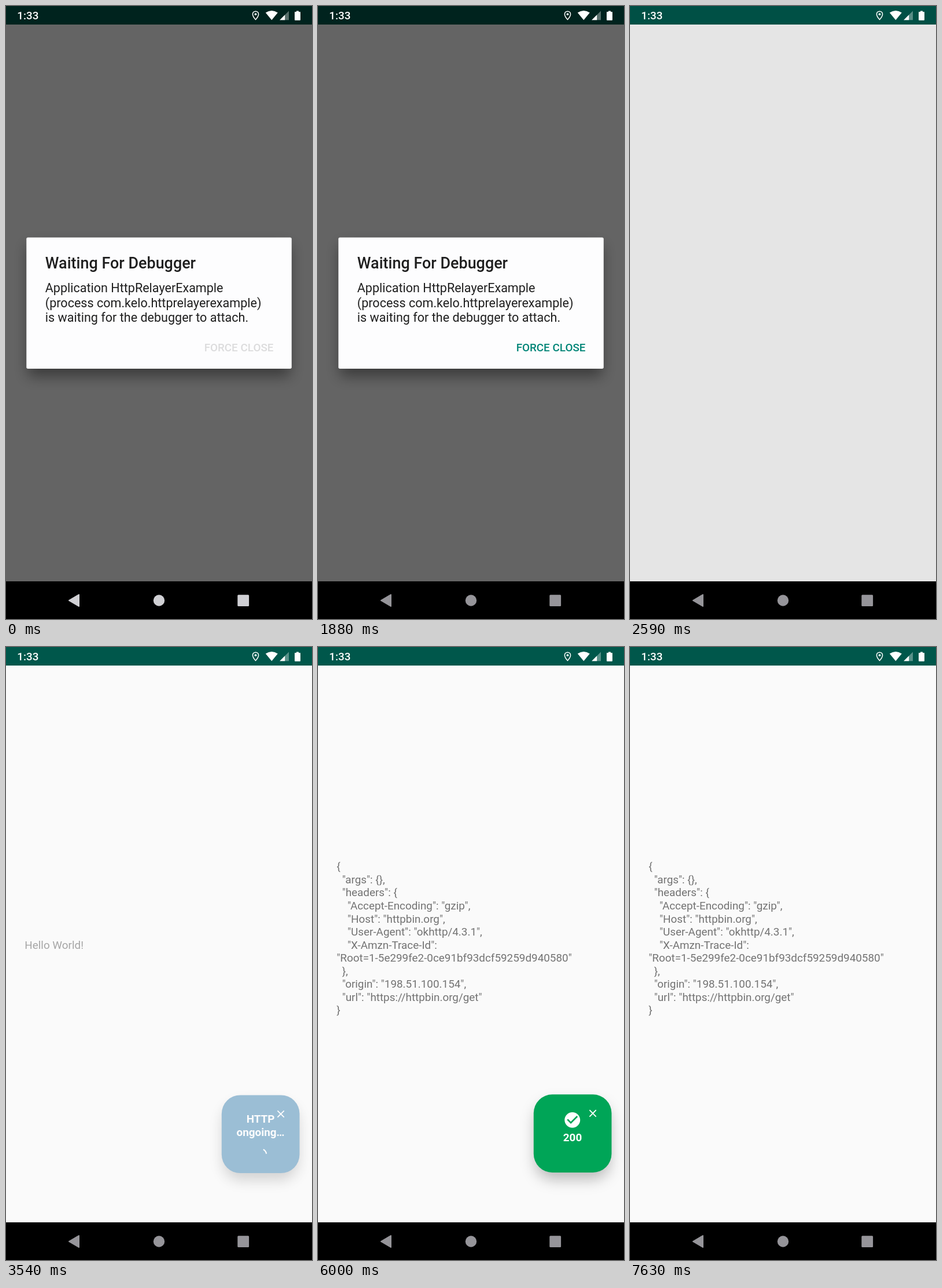
Animation of 529 by 1058 pixels, one loop 7.67 s. Source, as an HTML page:

```html
<!DOCTYPE html>
<html lang="en">
<head>
<meta charset="utf-8">
<title>HTTP popup demo</title>
<style>
  html, body { margin: 0; width: 100%; height: 100%; overflow: hidden; background: #000; }
  svg { display: block; width: 100vw; height: 100vh; }
  text { font-family: Roboto, "Noto Sans", sans-serif; font-size: 18.86px; white-space: pre; }
  .medium { font-weight: 500; }
  .bold { font-weight: 700; fill: #fff; text-anchor: middle; }
  .body { font-size: 21.55px; }
</style>
</head>
<body>
<svg viewBox="0 0 529 1058" xmlns="http://www.w3.org/2000/svg">
  <defs>
    <filter id="blur" x="-30%" y="-30%" width="160%" height="160%">
      <feGaussianBlur stdDeviation="12"/>
    </filter>
    <clipPath id="screen"><rect width="529" height="993"/></clipPath>
  </defs>

  <rect width="529" height="993" fill="#fafafa"/>
  <rect id="bar" width="529" height="32" fill="#00574b"/>

  <g id="content" clip-path="url(#screen)">
    <g id="page" fill="#000" fill-opacity=".54"></g>
    <g id="popup">
      <rect x="375" y="787" width="130" height="132" rx="32" fill-opacity=".26" filter="url(#blur)"/>
      <rect id="card" x="372.8" y="772.3" width="134.7" height="134.7" rx="32.3"/>
      <path transform="translate(464.3 794.1) scale(.898)" fill="#fff"
        d="M19 6.41L17.59 5 12 10.59 6.41 5 5 6.41 10.59 12 5 17.59 6.41 19 12 13.41 17.59 19 19 17.59 13.41 12z"/>
      <g id="ongoing">
        <text class="bold" x="440" y="820.3">HTTP</text>
        <text class="bold" x="440" y="842.8">ongoing…</text>
        <path id="spinner" fill="none" stroke="#fff" stroke-width="2.2"/>
      </g>
      <g id="done">
        <path transform="translate(423.6 800.2) scale(1.347)" fill="#fff"
          d="M12 2C6.48 2 2 6.48 2 12s4.48 10 10 10 10-4.48 10-10S17.52 2 12 2zm-2 15l-5-5 1.41-1.41L10 14.17l7.59-7.59L19 8l-9 9z"/>
        <text class="bold" x="440" y="853.3">200</text>
      </g>
    </g>
  </g>

  <rect id="dim" width="529" height="993"/>

  <g id="dialog">
    <rect x="38" y="413" width="453" height="226" rx="4" fill-opacity=".42" filter="url(#blur)"/>
    <rect x="35.3" y="399.5" width="458.5" height="226.5" rx="2.7" fill="#fdfdfe"/>
    <g fill="#1f1f1f">
      <text class="medium" x="67.8" y="452.6" style="font-size:26.94px">Waiting For Debugger</text>
      <text class="body" x="67.8" y="494">Application HttpRelayerExample</text>
      <text class="body" x="67.8" y="519.5">(process com.kelo.httprelayerexample)</text>
      <text class="body" x="67.8" y="545">is waiting for the debugger to attach.</text>
    </g>
    <text id="button" class="medium" x="462.5" y="595.6" text-anchor="end">FORCE CLOSE</text>
  </g>

  <g fill="#fff">
    <text class="medium" x="19.3" y="23.2">1:33</text>
    <path d="M431.5 9.2c-3 0-5.1 2.2-5.1 5 0 3.6 5.1 9.3 5.1 9.3s5.1-5.7 5.1-9.3c0-2.8-2.1-5-5.1-5z"
      fill="none" stroke="#fff" stroke-width="1.5"/>
    <circle cx="431.5" cy="14.2" r="1.9"/>
    <path d="M459.3 24.2L448.8 11.6Q459.3 4.4 469.8 11.6z"/>
    <path d="M489 8.6V24.2H473.2z" fill-opacity=".35"/>
    <path d="M482.2 15.3V24.2H473.2z"/>
    <path d="M502 8.4h4v1.6h2.2q.8 0 .8.8v13q0 .9-.9.9h-8.200q-.9 0-.9-.9v-13q0-.8.8-.8h2.200z"/>
  </g>

  <rect y="993" width="529" height="65"/>
  <g id="nav">
    <path d="M109 1026L126 1016V1036z" stroke-width="2" stroke-linejoin="round"/>
    <circle cx="264.5" cy="1026" r="9.7" stroke="none"/>
    <rect x="400.3" y="1016.200" width="19.8" height="19.8" rx="1.5" stroke="none"/>
  </g>
</svg>

<script>
  const LOOP = 7670;
  const DISMISS = 2420, REVEAL = 3440, RESPONSE = 4300, LEAVE = 6365;
  const TRAVEL = 102;
  const $ = id => document.getElementById(id);
  const clamp = x => Math.max(0, Math.min(1, x));
  const span = (t, start, length) => clamp((t - start) / length);
  const smooth = x => x * x * (3 - 2 * x);
  const show = (id, on) => $(id).style.display = on ? '' : 'none';

  const response = [
    '{',
    '  "args": {},',
    '  "headers": {',
    '    "Accept-Encoding": "gzip",',
    '    "Host": "httpbin.org",',
    '    "User-Agent": "okhttp/4.3.1",',
    '    "X-Amzn-Trace-Id":',
    '"Root=1-5e299fe2-0ce91bf93dcf59259d940580"',
    '  },',
    '  "origin": "198.51.100.154",',
    '  "url": "https://httpbin.org/get"',
    '}'
  ];

  function addLines(id, lines, top) {
    const group = document.createElementNS('http://www.w3.org/2000/svg', 'g');
    group.id = id;
    lines.forEach((line, i) => {
      const text = document.createElementNS('http://www.w3.org/2000/svg', 'text');
      text.setAttribute('x', 32.3);
      text.setAttribute('y', top + i * 22.53);
      text.textContent = line.replace(/ /g, '\u00a0');
      group.append(text);
    });
    $('page').append(group);
  }
  addLines('hello', ['Hello World!'], 520.6);
  addLines('json', response, 385.4);

  function arc(t) {
    const turn = Math.max(0, t) / 1333, n = Math.floor(turn), p = turn - n;
    const base = -90 + turn * 216 + n * 270;
    const from = base + 270 * smooth(clamp(2 * p - 1));
    const to = base + 4 + 270 * smooth(clamp(2 * p));
    const point = deg => {
      const a = deg * Math.PI / 180;
      return `${439.7 + 10.6 * Math.cos(a)} ${875.3 + 10.6 * Math.sin(a)}`;
    };
    return `M${point(from)}A10.6 10.6 0 ${to - from > 180 ? 1 : 0} 1 ${point(to)}`;
  }

  function draw(t) {
    const first = t < 40;
    $('button').setAttribute('fill', first ? '#dcdcdd' : '#008577');
    $('nav').setAttribute('fill', first ? '#d0d0d4' : '#96959a');
    $('nav').setAttribute('stroke', first ? '#d0d0d4' : '#96959a');

    $('dim').setAttribute('opacity', 0.6 * (1 - span(t, DISMISS, 200)));
    $('dialog').setAttribute('opacity', 1 - span(t, DISMISS, 150));

    const done = t >= RESPONSE;
    show('content', t >= REVEAL);
    $('content').setAttribute('opacity', span(t, REVEAL, 160));
    show('hello', !done);
    show('json', done);
    show('ongoing', !done);
    show('done', done);
    $('card').setAttribute('fill', done ? '#00a557' : '#649bc0');
    $('spinner').setAttribute('d', arc(t - 3363));

    const enter = Math.pow(1 - span(t, 3240, 360), 2.5);
    const leave = 0.5 - 0.5 * Math.cos(Math.PI * span(t, LEAVE, 300));
    $('popup').setAttribute('transform', `translate(0 ${TRAVEL * (enter + leave)})`);
    $('popup').setAttribute('opacity', 1 - leave);
  }

  function tick() {
    draw(performance.now() % LOOP);
    requestAnimationFrame(tick);
  }
  tick();
</script>
</body>
</html>
```
